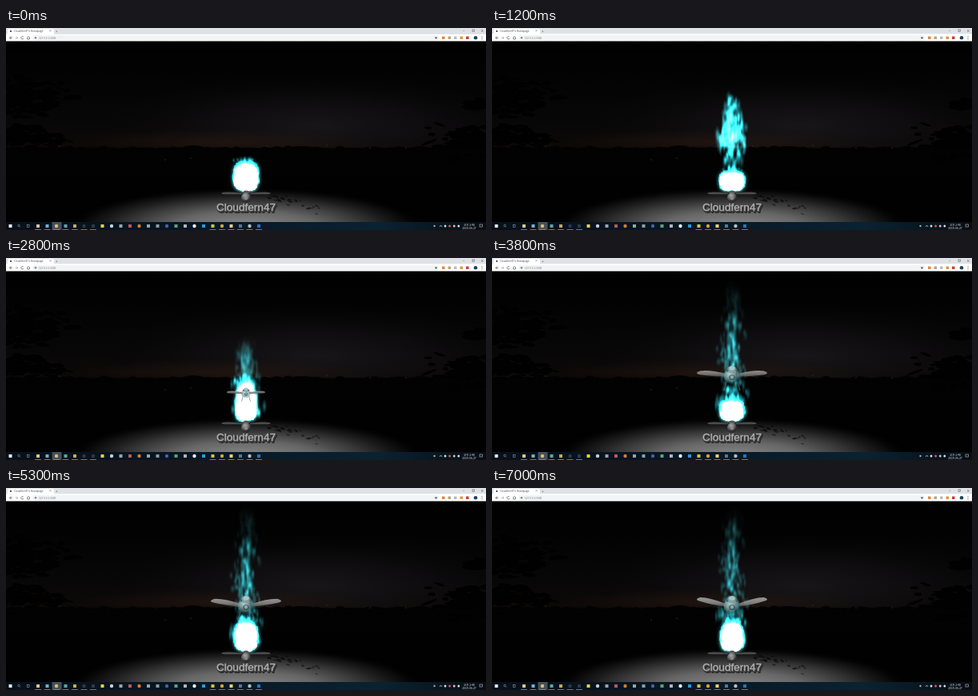
Animation, 600 px wide and 253 px high, one loop 7.1 s. Source, as an HTML page with a canvas:

```html
<!DOCTYPE html>
<html lang="en">
<head>
<meta charset="utf-8">
<title>Flame and plane</title>
<style>
html, body { margin: 0; width: 100%; height: 100%; overflow: hidden; background: #000; }
canvas { display: block; width: 600px; height: 253px; }
</style>
</head>
<body>
<canvas id="stage" width="600" height="253"></canvas>
<script>
const W = 600, H = 253, LOOP = 7100, STEP = 100;
const NAME = 'Cloudfern47';
const stage = document.getElementById('stage').getContext('2d');
let ctx = stage;

const clamp = (v, a = 0, b = 1) => Math.min(b, Math.max(a, v));
const rand = (i, k = 0) => {
  const v = Math.sin(i * 127.1 + k * 311.7 + 17.3) * 43758.5453;
  return v - Math.floor(v);
};
const spread = (i, k) => (rand(i, k) + rand(i, k + 1) + rand(i, k + 2)) / 1.5 - 1;

function track(keys, t) {
  let prev = keys[0];
  for (const key of keys) {
    if (t < key[0]) {
      const p = clamp((t - prev[0]) / (key[0] - prev[0] || 1));
      return prev[1] + (key[1] - prev[1]) * p;
    }
    prev = key;
  }
  return prev[1];
}

function layer(w, h, paint) {
  const c = document.createElement('canvas');
  c.width = w; c.height = h;
  const outer = ctx;
  ctx = c.getContext('2d');
  paint();
  ctx = outer;
  return c;
}

function rect(x, y, w, h, color) {
  ctx.fillStyle = color;
  ctx.fillRect(x, y, w, h);
}

function oval(x, y, rx, ry, color, turn = 0) {
  ctx.fillStyle = color;
  ctx.beginPath();
  ctx.ellipse(x, y, rx, ry, turn, 0, Math.PI * 2);
  ctx.fill();
}

function line(points, color, width = 0.7) {
  ctx.strokeStyle = color;
  ctx.lineWidth = width;
  ctx.beginPath();
  points.forEach(([x, y]) => ctx.lineTo(x, y));
  ctx.stroke();
}

function label(text, x, y, size, color, align = 'left') {
  ctx.font = `${size}px "Noto Sans CJK KR", "Noto Sans CJK", "Noto Sans", sans-serif`;
  ctx.fillStyle = color;
  ctx.textAlign = align;
  ctx.fillText(text, x, y);
}

function gradient(x0, y0, x1, y1, stops) {
  const g = ctx.createLinearGradient(x0, y0, x1, y1);
  stops.forEach(([at, color]) => g.addColorStop(at, color));
  return g;
}

function glow(x, y, r0, r1, stops) {
  const g = ctx.createRadialGradient(x, y, r0, x, y, r1);
  stops.forEach(([at, color]) => g.addColorStop(at, color));
  return g;
}

function flatGlow(x, y, rx, ry, stops) {
  ctx.save();
  ctx.translate(x, y);
  ctx.scale(1, ry / rx);
  oval(0, 0, rx, rx, glow(0, 0, 0, rx, stops));
  ctx.restore();
}

// Night landscape
function foliage(seed, count, x, y, w, h) {
  for (let i = 0; i < count; i++) {
    const a = seed + i;
    oval(x + spread(a, 1) * w, y + spread(a, 5) * h,
      3 + rand(a, 9) * 9, 1 + rand(a, 10) * 2.5, '#010101', spread(a, 11) * 0.5);
  }
}

function landscape() {
  rect(0, 16, W, 227, gradient(0, 16, 0, 243, [
    [0, '#000'], [0.2, '#030303'], [0.45, '#080708'], [0.58, '#0b0807'], [0.62, '#030202'], [1, '#000']]));
  ctx.save();
  ctx.beginPath();
  ctx.rect(0, 16, W, 134);
  ctx.clip();
  flatGlow(385, 122, 260, 62, [[0, 'rgba(27,25,28,.8)'], [0.5, 'rgba(20,18,20,.55)'], [1, 'rgba(10,9,10,0)']]);
  flatGlow(270, 143, 190, 16, [[0, 'rgba(42,25,17,.6)'], [1, 'rgba(42,25,17,0)']]);
  ctx.restore();
  foliage(100, 150, 20, 88, 75, 40);
  foliage(300, 110, 20, 135, 80, 22);
  foliage(500, 100, 578, 142, 60, 28);
  foliage(700, 25, 592, 96, 18, 8);
  for (let i = 0; i < 85; i++) {
    oval(i * 7.2, 154 + spread(i, 30) * 4, 7, 3 + rand(i, 31) * 2.5, '#030202');
  }
  oval(234, 153, 17, 6, '#020202');
  oval(370, 153, 20, 5, '#020202');
  [[67, 148], [199, 165], [231, 163], [326, 148], [401, 147], [500, 150], [455, 150]]
    .forEach(([x, y]) => oval(x, y, 1, 0.6, '#4a2b20'));

  ctx.save();
  ctx.beginPath();
  ctx.rect(0, 195, W, 48);
  ctx.clip();
  flatGlow(300, 250, 225, 51, [
    [0, '#8c8c8c'], [0.4, '#666'], [0.62, '#3c3c3c'], [0.78, '#1c1c1c'], [0.9, '#080808'], [1, 'rgba(0,0,0,0)']]);
  ctx.restore();
  for (let i = 0; i < 38; i++) {
    const d = rand(i, 40);
    oval(322 + d * 72, 207 + d * 22 + spread(i, 41) * 9,
      1 + rand(i, 45) * 2.5, 0.5 + rand(i, 46) * 0.8, 'rgba(10,10,10,.6)', 0.2);
  }
}

// Browser frame and taskbar
function browser() {
  rect(0, 0, W, 7.5, '#dee1e6');
  ctx.fillStyle = '#fff';
  ctx.beginPath();
  ctx.roundRect(2, 1, 58, 8, 2);
  ctx.fill();
  rect(0, 7.5, W, 9, '#fff');
  oval(6, 4, 1.1, 1.1, '#333');
  label(`${NAME}'s Homepage`, 10, 5.2, 3.1, '#444');
  label('×', 53.5, 5.4, 4, '#555');
  label('+', 62, 5.6, 4.5, '#555');
  label('−', 571, 5, 4, '#333');
  ctx.strokeStyle = '#444';
  ctx.lineWidth = 0.5;
  ctx.strokeRect(583, 2, 2.5, 2.5);
  label('×', 593, 5, 4.5, '#333');
  line([[6.5, 10.5], [4.5, 12.3], [6.5, 14]], '#555');
  line([[4.5, 12.3], [8, 12.3]], '#555');
  line([[13, 10.5], [15, 12.3], [13, 14]], '#aaa');
  line([[11.5, 12.3], [15, 12.3]], '#aaa');
  ctx.beginPath();
  ctx.arc(20.5, 12.3, 1.7, 0.4, 5.6);
  ctx.strokeStyle = '#555';
  ctx.stroke();
  line([[26, 12.3], [28, 10.5], [30, 12.3], [29.3, 12.3], [29.3, 14], [26.7, 14], [26.7, 12.3]], '#555');
  ctx.fillStyle = '#f1f3f4';
  ctx.beginPath();
  ctx.roundRect(33, 9, 508, 6.6, 3.3);
  ctx.fill();
  oval(37, 12.3, 1.3, 1.3, '#888');
  label('127.0.0.1:5000', 41, 13.7, 3.2, '#777');
  oval(537.5, 12.3, 1.4, 1.4, '#777');
  ['#e7863c', '#b9a681', '#bbb', '#d99c3a', '#d33d36'].forEach((c, i) =>
    rect(545 + i * 7.5, 10.5, 3.5, 3.5, c));
  oval(587, 12.3, 2.3, 2.3, '#1d4558');
  [10.5, 12.3, 14.1].forEach(y => oval(595, y, 0.5, 0.5, '#444'));
}

function taskbar() {
  rect(0, 243, W, 10, gradient(0, 0, W, 0, [
    [0, '#06101b'], [0.45, '#081826'], [0.78, '#0a2231'], [1, '#070d14']]));
  rect(57.5, 243, 12, 10, '#43515c');
  rect(3.5, 246, 4, 4, '#e8eef2');
  ctx.strokeStyle = '#999';
  ctx.lineWidth = 0.6;
  ctx.beginPath();
  ctx.arc(16, 247.5, 1.3, 0, 7);
  ctx.stroke();
  line([[17, 248.5], [18, 249.6]], '#999', 0.6);
  ctx.strokeRect(26.5, 246.5, 2.5, 2.8);
  const colors = ['#dcc88b', '#7bb0c0', '#d9c065', '#5ea7a5', '#c6ad4b', '#30383c', '#30383c',
    '#f1d33a', '#c8cfd4', '#a2a4a0', '#ba5a58', '#d37d2d', '#99a994', '#8f9ea0', '#4e5fa0',
    '#62a276', '#b5b5b5', '#f0f0f0', '#2c9ad0', '#d6c33b', '#d8a638', '#ebd273', '#55798d',
    '#b9bdc0', '#1f78c0'];
  colors.forEach((color, i) => {
    const x = 40 + i * 11.5;
    if (i % 3 === 2) oval(x, 248, 2.2, 2.2, color);
    else rect(x - 2, 246, 4, 4, color);
    if (i < 7 || i > 18) rect(x - 4, 252.2, 8, 0.8, '#5f99c8');
  });
  oval(535.5, 248, 1.2, 1.2, '#9cabb4');
  line([[542, 249], [543.5, 247], [545, 249]], '#ddd');
  ['#ddd', '#e05c55', '#ccc', '#ddd'].forEach((c, i) => oval(549 + i * 5.6, 248, 1.4, 1.5, c));
  label('오후 2:48', 579, 247.5, 3.4, '#eee', 'center');
  label('2019-06-27', 579, 251.8, 3.4, '#eee', 'center');
  ctx.strokeStyle = '#aaa';
  ctx.strokeRect(592, 246, 3.5, 3);
}

function wing(side, root, tip, lift, thick, color) {
  const mid = side * (root + tip) / 2;
  ctx.fillStyle = color;
  ctx.beginPath();
  ctx.moveTo(side * root, 0);
  ctx.quadraticCurveTo(mid, -lift * 0.6 - thick * 0.7, side * (tip - 5), -lift - thick * 0.35);
  ctx.quadraticCurveTo(side * (tip + 3), -lift + 0.5, side * (tip - 5), 1.2 - lift + thick * 0.25);
  ctx.quadraticCurveTo(mid, thick * 0.55 - lift * 0.35, side * root, thick * 0.6);
  ctx.fill();
}

function title() {
  ctx.save();
  ctx.translate(300, 207);
  [-1, 1].forEach(side => wing(side, 5, 32, 0.5, 2.2, '#4c4c4c'));
  oval(0, -1, 3.5, 2.5, '#555');
  oval(0, 5.5, 6, 6.5, glow(-1, 3, 0, 7, [[0, '#aaa'], [0.5, '#747474'], [1, '#2c2c2c']]));
  oval(0, 6, 2.2, 2.2, '#8a8a8a');
  ctx.restore();

  ctx.font = '13.6px "Liberation Sans", Arial, sans-serif';
  ctx.textAlign = 'center';
  ctx.lineJoin = 'round';
  ctx.lineWidth = 2;
  for (let d = 3; d > 0; d--) {
    ctx.strokeStyle = d > 1 ? '#252525' : '#3d3d3d';
    ctx.strokeText(NAME, 300 + d * 0.5, 229 + d * 0.6);
  }
  ctx.lineWidth = 0.8;
  ctx.strokeStyle = '#707070';
  ctx.strokeText(NAME, 300, 229);
  ctx.fillStyle = '#b4b4b4';
  ctx.fillText(NAME, 300, 229);
}

// Flame
const spark = layer(32, 32, () => rect(0, 0, 32, 32, glow(16, 16, 0, 16, [
  [0, 'rgba(70,205,212,1)'], [0.45, 'rgba(35,180,190,.55)'], [1, 'rgba(0,140,155,0)']])));

function wisp(x, y, w, h, alpha) {
  ctx.globalAlpha = clamp(alpha);
  ctx.drawImage(spark, x - w, y - h, w * 2, h * 2);
}

function risingBurst(t) {
  const age = (t - 400) / 800;
  if (age < 0 || t > 2300) return;
  const half = 18 + 36 * Math.min(age, 1.4);
  const mid = 172 - 37 * age;
  const fade = clamp(age * 3) * clamp((2300 - t) / 1000);
  for (let i = 0; i < 240; i++) {
    const v = spread(i, 50);
    const width = 25 * (1 - 0.75 * Math.abs(v));
    const sway = Math.sin(t / 260 + i) * 1.5;
    wisp(300 + spread(i, 55) * width + sway, mid + v * half * 1.15,
      2 + rand(i, 58) * 2.2, 5 + rand(i, 59) * 7, 0.5 * fade);
  }
}

function plume(t) {
  const top = track([[1800, 180], [2400, 125], [2800, 103], [3200, 88], [3800, 34], [4600, 26], [7100, 26]], t);
  const power = track([[1800, 0], [2500, 1], [3200, 0.95], [3800, 0.85], [7100, 0.85]], t);
  if (!power) return;
  for (let i = 0; i < 260; i++) {
    const u = (t / 1500 + rand(i, 60)) % 1;
    const width = 28 * (1 - 0.5 * u);
    const sway = Math.sin(t / 240 + i * 2) * 1.4;
    wisp(300 + spread(i, 62) * width + sway, 196 - (196 - top) * u,
      2 + rand(i, 66) * 2, 5 + rand(i, 67) * 6, power * 0.62 * Math.pow(1 - u, 1.15));
  }
}

function blob(top, rx, taper, seed, color) {
  const mid = (top + 204) / 2, ry = (204 - top) / 2;
  ctx.fillStyle = color;
  ctx.beginPath();
  for (let i = 0; i < 40; i++) {
    const a = i / 40 * Math.PI * 2;
    const c = Math.cos(a), s = Math.sin(a);
    const rough = 1 + (rand(i, seed) - 0.5) * 0.13;
    const x = Math.sign(c) * Math.pow(Math.abs(c), 0.65) * rx * rough;
    const y = Math.sign(s) * Math.pow(Math.abs(s), 0.7) * ry * rough;
    ctx.lineTo(300 + x * (1 - taper * (0.5 - s * 0.5)), mid + y);
  }
  ctx.fill();
}

function ember(t) {
  const top = track([[0, 168], [500, 170], [1200, 179], [1900, 174], [2800, 154], [3300, 170],
    [3800, 177], [4600, 167], [7100, 167]], t);
  const taper = track([[1200, 0], [2800, 0.35], [3800, 0.12], [7100, 0.2]], t);
  const seed = 80 + t / STEP;
  for (let i = 0; i < 20; i++) {
    wisp(300 + spread(i, seed) * 19, top + 1 - rand(i, seed + 4) * 5, 2.5, 3 + rand(i, seed + 5) * 4, 0.45);
  }
  ctx.globalAlpha = 1;
  ctx.shadowColor = '#12cbd3';
  ctx.shadowBlur = 5;
  blob(top - 1, 17, taper, seed, 'rgba(35,205,215,.6)');
  ctx.shadowColor = '#bff';
  ctx.shadowBlur = 4;
  blob(top + 2, 15, taper, seed + 1, '#fff');
  ctx.shadowBlur = 0;
}

function plane(t) {
  const size = clamp((t - 2250) / 1000);
  if (!size) return;
  const lift = track([[2800, 0], [3300, 1], [3800, 1.5], [4600, 3], [6000, 5], [7000, 6]], t);
  ctx.save();
  ctx.globalAlpha = 0.85;
  ctx.translate(300, 196 - 51 * size);
  ctx.scale(size, size);
  const metal = gradient(0, -8, 0, 5, [[0, '#b0b0b0'], [0.55, '#8f8f8f'], [1, '#454545']]);
  line([[-7, 10], [-10, 21]], 'rgba(75,105,108,.7)', 1.8);
  line([[7, 10], [10, 21]], 'rgba(75,105,108,.7)', 1.8);
  [-1, 1].forEach(side => wing(side, 8, 45, lift, 6, metal));
  oval(0, 3, 10.5, 10, glow(-2, 0, 1, 12, [
    [0, '#c4d4d4'], [0.45, 'rgba(140,170,170,.9)'], [0.8, 'rgba(85,135,137,.7)'], [1, 'rgba(40,95,98,.4)']]));
  oval(0, -5, 6, 5, 'rgba(125,150,152,.8)');
  oval(0, -7, 3.8, 2.8, '#b5cccc');
  oval(-6, -4, 1.5, 1.8, '#45585a');
  oval(6, -4, 1.5, 1.8, '#45585a');
  oval(0, 4.5, 3.6, 3.6, '#3a4d50');
  oval(0, 4, 2.2, 2.2, '#9ab5b7');
  ctx.restore();
}

const backdrop = layer(W, H, () => { landscape(); browser(); taskbar(); });
const emblem = layer(W, H, title);

function draw(now) {
  const t = Math.floor(now % LOOP / STEP) * STEP;
  ctx.globalAlpha = 1;
  ctx.drawImage(backdrop, 0, 0);
  ctx.globalCompositeOperation = 'lighter';
  risingBurst(t);
  plume(t);
  ember(t);
  ctx.globalCompositeOperation = 'source-over';
  ctx.globalAlpha = 1;
  plane(t);
  ctx.drawImage(emblem, 0, 0);
}

const start = performance.now();
function tick() {
  draw(performance.now() - start);
  requestAnimationFrame(tick);
}
tick();
</script>
</body>
</html>
```
